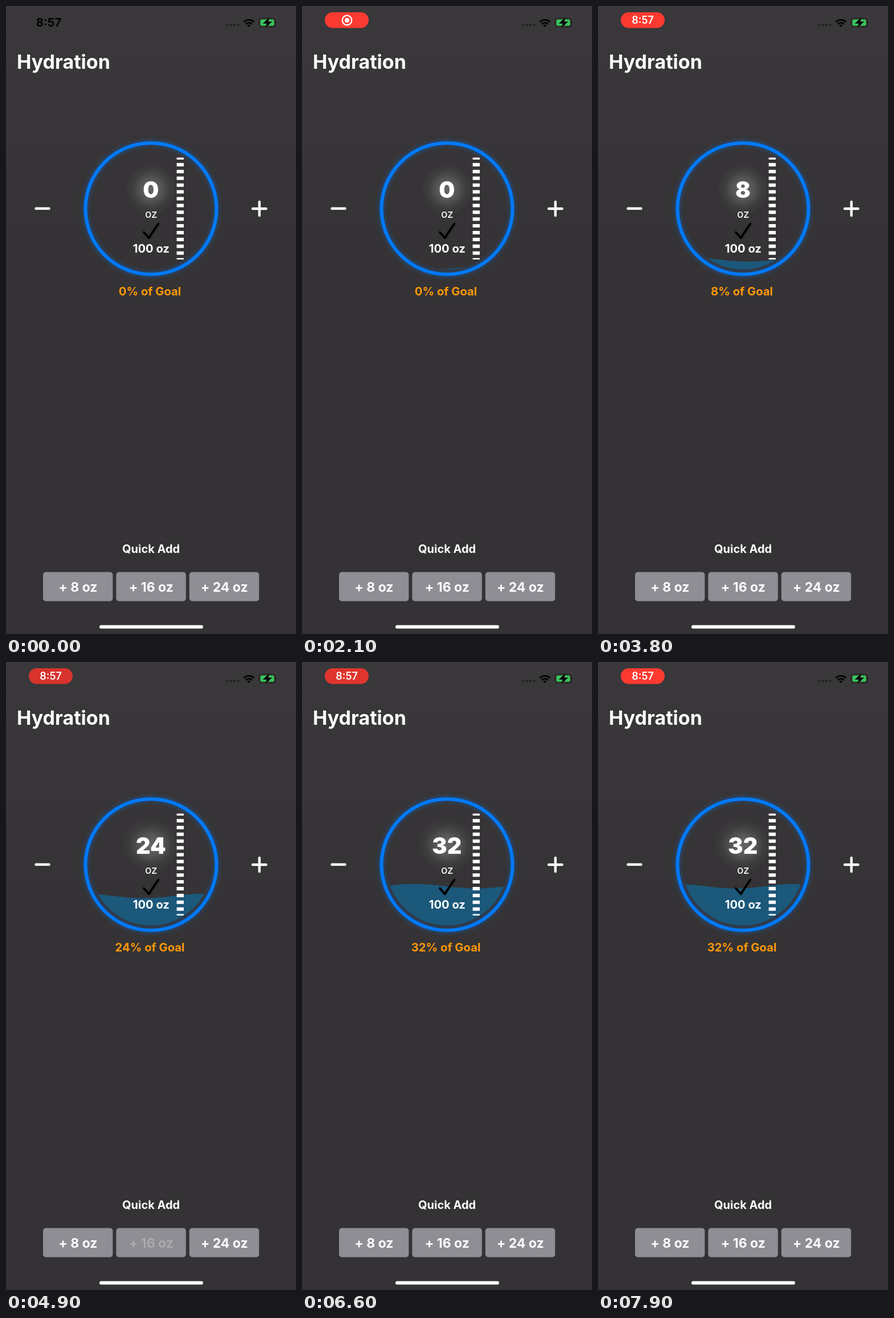
An HTML page that plays this animation: 509 by 1100 pixels, repeating every 8 s.

```html
<!DOCTYPE html>
<html lang="en">
<head>
<meta charset="utf-8">
<title>Hydration</title>
<style>
  html, body { margin: 0; width: 100%; height: 100%; overflow: hidden; background: #343235; }
  svg { display: block; width: 100%; height: 100%; font-family: Inter, sans-serif; font-weight: 700; fill: #fff; }
  .mid { text-anchor: middle; }
  .line { fill: none; stroke-linecap: round; stroke-linejoin: round; }
</style>
</head>
<body>
<svg viewBox="0 0 509 1100">
  <defs>
    <linearGradient id="shade" x2="0" y2="1">
      <stop stop-color="#3a383a"/><stop offset=".35" stop-color="#353335"/><stop offset="1" stop-color="#343234"/>
    </linearGradient>
    <radialGradient id="glow">
      <stop stop-color="#fff" stop-opacity=".24"/>
      <stop offset=".35" stop-color="#fff" stop-opacity=".18"/>
      <stop offset=".7" stop-color="#fff" stop-opacity=".05"/>
      <stop offset="1" stop-color="#fff" stop-opacity="0"/>
    </radialGradient>
    <filter id="soft"><feGaussianBlur stdDeviation="1.5"/></filter>
    <clipPath id="bowl"><circle cx="254.5" cy="355" r="106.5"/></clipPath>
  </defs>
  <rect width="509" height="1100" fill="url(#shade)"/>

  <!-- status bar -->
  <text id="clock" class="mid" x="75" y="36.3" font-size="20.3" fill="#000">8:57</text>
  <g id="pill">
    <rect id="pillBody" x="40" y="11" width="77" height="27.5" rx="13.75"/>
    <g id="record">
      <circle cx="79" cy="25" r="8.3" fill="none" stroke="#fff" stroke-width="2.2"/>
      <circle cx="79" cy="25" r="4.2"/>
    </g>
    <text id="pillTime" class="mid" x="78.5" y="31.3" font-size="18" font-weight="600">8:57</text>
  </g>
  <path class="line" d="M388.5 33.5H409" stroke="#202021" stroke-width="4" stroke-dasharray="0 6.4"/>
  <g fill="none" stroke="#000" stroke-width="2.9">
    <path d="M417 28.2A13 13 0 0 1 435.4 28.2M420.4 31.7A8.3 8.3 0 0 1 432 31.7"/>
    <path d="M423.2 33.6Q426.2 31.4 429.2 33.6L426.2 36.7Z" fill="#000" stroke="none"/>
  </g>
  <rect x="444.5" y="21.5" width="28" height="15" rx="4.5" fill="none" stroke="#1c1c1d" stroke-width="1.3"/>
  <path d="M474 26.5Q476 29 474 31.5Z" fill="#1c1c1d"/>
  <rect x="446.5" y="23.5" width="24" height="11" rx="2.6" fill="#34c759"/>
  <path d="M461.8 20.5L452.3 30.2H458L456 37.5L465.7 27.7H459.8Z" fill="#000" stroke="#353335" stroke-width="1.6" paint-order="stroke"/>

  <text x="19" y="109.5" font-size="34">Hydration</text>

  <!-- gauge -->
  <circle cx="254.5" cy="355" r="115" fill="none" stroke="#007aff" stroke-width="16" opacity=".15" filter="url(#soft)"/>
  <circle cx="254.5" cy="355" r="115" fill="none" stroke="#007aff" stroke-width="6"/>
  <path id="water" fill="#1b587a" clip-path="url(#bowl)"/>
  <ellipse id="halo" cx="254.5" cy="321" ry="46" fill="url(#glow)"/>
  <path d="M305.8 265.5V444" stroke="#fff" stroke-width="12.4" stroke-dasharray="6 5.9" stroke-dashoffset="2.4"/>
  <text id="amount" class="mid" x="254.3" y="336" font-size="39.5" font-weight="900"></text>
  <text class="mid" x="254.8" y="370.5" font-size="19" font-weight="500" fill="#f3f2f3">oz</text>
  <path class="line" d="M242 396.5L250.8 406.3L267.3 381.5" stroke="#000" stroke-width="4"/>
  <text class="mid" x="254.8" y="432" font-size="20.2">100 oz</text>
  <text id="goal" class="mid" x="252.6" y="507" font-size="20.3" fill="#ff9809"></text>
  <path class="line" d="M52.5 354.8H75.5M433 355H456.5M444.8 343V367" stroke="#fff" stroke-width="4.4"/>

  <!-- quick add -->
  <text class="mid" x="254.6" y="958" font-size="20">Quick Add</text>
  <g id="buttons" class="mid" font-size="23"></g>
  <rect x="164" y="1084.5" width="182" height="6" rx="3"/>
</svg>
<script>
const LOOP = 8000;
const PRESSES = [{ at: 2500, add: 8 }, { at: 4800, add: 16 }, { at: 6200, add: 8 }];
const el = id => document.getElementById(id);
const ramp = (t, start, length) => Math.min(1, Math.max(0, (t - start) / length));

const sizes = [8, 16, 24];
el('buttons').innerHTML = sizes.map((oz, i) => {
  const x = 65 + i * 128.4;
  return `<rect x="${x}" y="991.5" width="122.4" height="51" rx="5" fill="#8f8e94"/>
    <text id="add${oz}" x="${x + 61.4}" y="1025.5">+ ${oz} oz</text>`;
}).join('');

function waterPath(ounces, t) {
  const left = 148, width = 213, trough = 220 - width * t / 1000;
  let d = `M${left} 470`;
  for (let x = left; x <= left + width; x += 3) {
    const y = 460.8 - width * ounces / 100 + 4 * Math.cos(2 * Math.PI * (x - trough) / width);
    d += `L${x} ${y.toFixed(2)}`;
  }
  return d + 'V470Z';
}

function drawPill(t) {
  const shown = ramp(t, 400, 300), swap = ramp(t, 3100, 300);
  const dim = (1 - Math.cos(2 * Math.PI * (t - 1900) / 2000)) / 2;
  const mix = (a, b) => Math.round(a + (b - a) * dim);
  el('clock').setAttribute('opacity', 1 - shown);
  el('pill').setAttribute('opacity', shown);
  el('pillBody').setAttribute('fill', `rgb(${mix(255, 216)},${mix(59, 51)},${mix(49, 45)})`);
  el('record').setAttribute('opacity', 1 - swap);
  el('pillTime').setAttribute('opacity', swap);
}

function draw(t) {
  const done = PRESSES.filter(p => t >= p.at);
  const ounces = done.reduce((sum, p) => sum + p.add, 0);
  el('amount').textContent = ounces;
  el('goal').textContent = `${ounces}% of Goal`;
  el('halo').setAttribute('rx', ounces > 9 ? 52 : 46);
  el('water').setAttribute('d', waterPath(ounces, t));
  for (const oz of sizes) {
    const last = done.filter(p => p.add === oz).pop();
    el('add' + oz).setAttribute('opacity', last ? 0.25 + 0.75 * ramp(t, last.at + 100, 300) : 1);
  }
  drawPill(t);
}

const start = performance.now();
function tick() {
  draw((performance.now() - start) % LOOP);
  requestAnimationFrame(tick);
}
tick();
</script>
</body>
</html>
```
